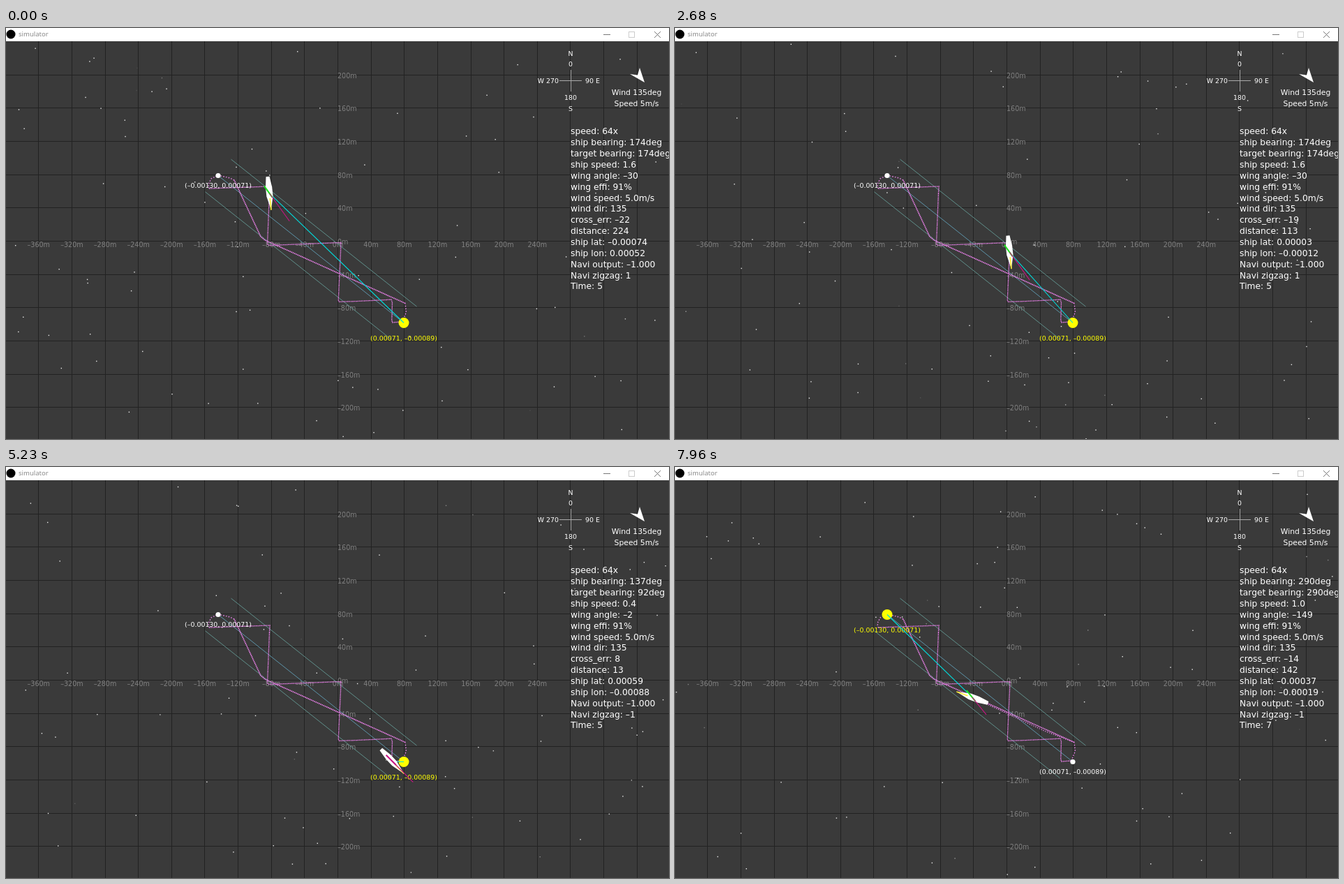
An HTML page with a canvas that plays this animation: 950 px wide and 589 px high, repeating every 8 s.

```html
<!DOCTYPE html>
<html lang="en">
<head>
<meta charset="utf-8">
<title>simulator</title>
<style>
html, body { margin: 0; width: 100%; height: 100%; overflow: hidden; background: #3a3a3a; }
canvas { display: block; }
</style>
</head>
<body>
<canvas id="stage" width="950" height="589"></canvas>
<script>
const ctx = document.getElementById('stage').getContext('2d');
const LOOP = 8, SWITCH = 5.42;
const OX = 475.5, OY = 305.5, SCALE = 1.191, METRES_PER_DEG = 111320;
const WEST = [304, 211.5], EAST = [570, 422.5];
const SANS = '"DejaVu Sans", sans-serif';
const VIOLET = '#ee82ee';

// Ship position: time (s), x, y
const COURSE = [
  [0, 377.5, 236.9], [.87, 374.8, 303], [.97, 374.4, 309.7], [1.12, 377, 311.5],
  [2.47, 480, 307.5], [2.62, 479.6, 317], [2.68, 479.5, 321.3], [3.57, 476.2, 390],
  [3.7, 477.5, 392.4], [4.03, 502, 391.6], [4.68, 552, 389.2], [4.78, 553.5, 393],
  [5.15, 552.8, 419], [5.23, 553.7, 422], [5.38, 568, 421], [5.52, 573.5, 407],
  [5.63, 572, 394.5], [6.3, 529.8, 378.4], [7.96, 426, 330.2], [8, 423.6, 329]
];
// Ship bearing: time (s), degrees
const BEARING = [
  [0, 174], [.97, 174], [1.2, 95], [2.45, 95], [2.68, 174], [3.57, 174], [3.8, 95],
  [4.66, 95], [4.85, 174], [5.13, 174], [5.23, 137], [5.38, 92], [5.42, 88], [5.7, -70], [8, -70]
];
const HOMEWARD = [[572, 394.5], [371, 304], [365, 299], [327, 218]];
const WEST_ARC = [[327, 218], [321, 215], [304, 211], [294, 216], [290, 224], [291, 230]];
const REACH = [[291, 230], [378, 227], [377.5, 237]];

const rad = deg => deg * Math.PI / 180;
const wrap = deg => ((deg + 180) % 360 + 360) % 360 - 180;
const dashed = value => String(value).replace('-', '–');

function sample(keys, t) {
  const i = Math.max(1, keys.findIndex(k => k[0] >= t));
  const a = keys[i - 1], b = keys[i], f = (t - a[0]) / (b[0] - a[0]);
  return a.slice(1).map((v, n) => v + (b[n + 1] - v) * f);
}

function text(str, x, y, size, color = '#fff', align = 'left', font = SANS) {
  ctx.font = `${size}px ${font}`;
  ctx.fillStyle = color;
  ctx.textAlign = align;
  ctx.fillText(dashed(str), x, y + size * .36);
}

function path(points, color, width = 1, dash = []) {
  ctx.beginPath();
  points.forEach(p => ctx.lineTo(...p));
  ctx.strokeStyle = color;
  ctx.lineWidth = width;
  ctx.setLineDash(dash);
  ctx.stroke();
  ctx.setLineDash([]);
}

function polygon(points, color) {
  ctx.beginPath();
  points.forEach(p => ctx.lineTo(...p));
  ctx.fillStyle = color;
  ctx.fill();
}

function disc([x, y], r, color) {
  ctx.beginPath();
  ctx.arc(x, y, r, 0, 7);
  ctx.fillStyle = color;
  ctx.fill();
}

function hash(n) {
  const v = Math.sin(n * 127.1 + 11.7) * 43758.5453;
  return v - Math.floor(v);
}

function drawGrid() {
  ctx.fillStyle = '#3a3a3a';
  ctx.fillRect(0, 0, 950, 589);
  const step = 40 * SCALE;
  ctx.fillStyle = '#222';
  for (let i = -9; i <= 9; i++) ctx.fillRect(Math.floor(OX + i * step), 19, 1, 570);
  for (let i = -5; i <= 5; i++) ctx.fillRect(0, Math.floor(OY + i * step), 950, 1);
  for (let i = -9; i <= 6; i++) text(i * 40 + 'm', OX + i * step, 311, 9.6, '#808080', 'center');
  for (let i = -5; i <= 5; i++) text(i * 40 + 'm', 475, OY - i * step + 1, 9.6, '#808080');
}

function drawDrift(t) {
  const life = 3.2;
  for (let i = 0; i < 88; i++) {
    const clock = t + hash(i) * life, age = clock % life;
    const seed = i * 7 + Math.floor(clock / life) * 1013;
    const x = hash(seed + 1) * 950 - age * 3.4, y = 22 + hash(seed + 2) * 567 - age * 3;
    if (y < 20) continue;
    ctx.fillStyle = `rgba(255,255,255,${Math.min(1, (life - age) * 2.5) * .9})`;
    ctx.fillRect(x, y, 1.4, 1.4);
  }
}

function drawTrack(t) {
  const fine = [1.6, .8], sparse = [1.5, 2.3];
  const outward = COURSE.slice(0, 15).map(k => k.slice(1));
  const eastArc = COURSE.slice(14, 17).map(k => k.slice(1));
  path(outward, VIOLET, 1.3, fine);
  path(eastArc, VIOLET, 1.4, sparse);
  path(HOMEWARD, VIOLET, 1.6, fine);
  path(WEST_ARC, VIOLET, 1.4, sparse);
  path(REACH, VIOLET, 1.3, fine);
  if (t > 5.63) {
    const wake = COURSE.filter(k => k[0] >= 5.63 && k[0] < t).map(k => k.slice(1));
    path([...wake, sample(COURSE, t)], VIOLET, 1.2, [1.3, 1.8]);
  }
}

function drawWaypoint(point, label, active) {
  disc(point, active ? 7.5 : 3.6, active ? '#ff0' : '#fff');
  text(label, point[0], point[1] + (active ? 22 : 14), 9.43, active ? '#ff0' : '#fff', 'center');
}

function drawCompass() {
  path([[793, 75.5], [825, 75.5]], '#aaa');
  path([[809.5, 60], [809.5, 91]], '#aaa');
  [['N', 37], ['0', 52], ['180', 100], ['S', 116]].forEach(([s, y]) => text(s, 809, y, 9.4, '#fff', 'center'));
  text('W 270', 792, 76, 9.4, '#fff', 'right');
  text('90 E', 830, 76, 9.4);
  polygon([[894, 66], [905, 67.5], [908, 57], [915, 78]], '#fff');
  text('Wind 135deg', 903.5, 92, 10.8, '#fff', 'center');
  text('Speed 5m/s', 903.5, 108, 10.8, '#fff', 'center');
}

function drawTitleBar() {
  ctx.fillStyle = '#fff';
  ctx.fillRect(0, 0, 950, 19);
  disc([7, 9], 6.5, '#000');
  text('simulator', 18, 8.5, 9.5, '#888', 'left', '"Noto Sans", sans-serif');
  path([[856, 9.5], [866, 9.5]], '#777');
  ctx.strokeStyle = '#ccc';
  ctx.strokeRect(892.5, 5.5, 8, 8);
  path([[929, 5], [938, 14]], '#777');
  path([[938, 5], [929, 14]], '#777');
}

function shipState(t) {
  const [x, y] = sample(COURSE, t), [bearing] = sample(BEARING, t);
  const back = t >= SWITCH;
  const from = back ? EAST : WEST, target = back ? WEST : EAST;
  const off = Math.abs(wrap(bearing - 135));
  const speed = off < 39 ? .35 + 1.25 * off / 39 : 1.6 - .6 * (off - 39) / 116;
  const wind = 5 * Math.SQRT1_2;
  const air = [wind + speed * Math.sin(rad(bearing)), wind - speed * Math.cos(rad(bearing))];
  const airBearing = Math.atan2(air[0], -air[1]) * 180 / Math.PI;
  const dx = target[0] - from[0], dy = target[1] - from[1];
  const cross = (dx * (y - from[1]) - dy * (x - from[0])) / Math.hypot(dx, dy) / SCALE;
  const south = t < .97 || (t >= 2.47 && t < 3.57) || (t >= 4.66 && t < 5.13);
  return {
    x, y, bearing, back, target, speed, air, cross, south,
    wing: wrap(airBearing - bearing), airBearing,
    distance: Math.hypot(target[0] - x, target[1] - y) / SCALE,
    goal: back ? 290 : south ? 174 : t > 5.13 ? 92 : 95,
    output: t > 5 ? -1 : Math.max(-1, Math.min(1, cross / 8))
  };
}

function drawShip(s) {
  path([[s.x, s.y], s.target], '#00dcdc', 1.1);
  ctx.save();
  ctx.translate(s.x, s.y);
  ctx.rotate(rad(s.bearing));
  polygon([[-2.5, 24], [-4.6, 9], [-4.6, -4], [0, -24], [4.6, -4], [4.6, 9], [2.5, 24]], '#fff');
  path([[0, -7], [0, -24]], '#ffee30', 1.6);
  ctx.restore();
  const ux = Math.sin(rad(s.airBearing)), uy = -Math.cos(rad(s.airBearing));
  const luffing = Math.abs(s.wing) < 12;
  path([[s.x - 13 * ux, s.y - 13 * uy], [s.x + 7 * ux, s.y + 7 * uy]], luffing ? '#c71585' : '#20e020', 2);
  path([[s.x, s.y], [s.x + s.air[0] * 7.75, s.y + s.air[1] * 7.75]], '#c71585', 1.1);
}

function drawReadout(s) {
  const degrees = px => (px / SCALE / METRES_PER_DEG).toFixed(5);
  [
    'speed: 64x',
    `ship bearing: ${Math.round((s.bearing + 360) % 360)}deg`,
    `target bearing: ${s.goal}deg`,
    `ship speed: ${s.speed.toFixed(1)}`,
    `wing angle: ${Math.round(s.wing)}`,
    'wing effi: 91%',
    'wind speed: 5.0m/s',
    'wind dir: 135',
    `cross_err: ${Math.round(s.cross)}`,
    `distance: ${Math.floor(s.distance)}`,
    `ship lat: ${degrees(s.x - OX)}`,
    `ship lon: ${degrees(OY - s.y)}`,
    `Navi output: ${s.output.toFixed(3)}`,
    `Navi zigzag: ${s.south ? 1 : -1}`,
    `Time: ${s.back ? 7 : 5}`
  ].forEach((line, i) => text(line, 809, 148 + i * 15.86, 12.3));
}

function drawLanes() {
  const dx = EAST[0] - WEST[0], dy = EAST[1] - WEST[1], len = Math.hypot(dx, dy);
  for (const metres of [-25, 0, 25]) {
    const nx = dy / len * metres * SCALE, ny = -dx / len * metres * SCALE;
    path([WEST, EAST].map(([x, y]) => [x + nx, y + ny]), metres ? '#5f8f8a' : '#5c93a8');
  }
}

function frame(now) {
  const t = now / 1000 % LOOP;
  const ship = shipState(t);
  drawGrid();
  drawDrift(t);
  drawLanes();
  drawTrack(t);
  drawWaypoint(WEST, '(–0.00130, 0.00071)', ship.back);
  drawWaypoint(EAST, '(0.00071, –0.00089)', !ship.back);
  drawShip(ship);
  drawCompass();
  drawReadout(ship);
  drawTitleBar();
  requestAnimationFrame(frame);
}
requestAnimationFrame(frame);
</script>
</body>
</html>
```
